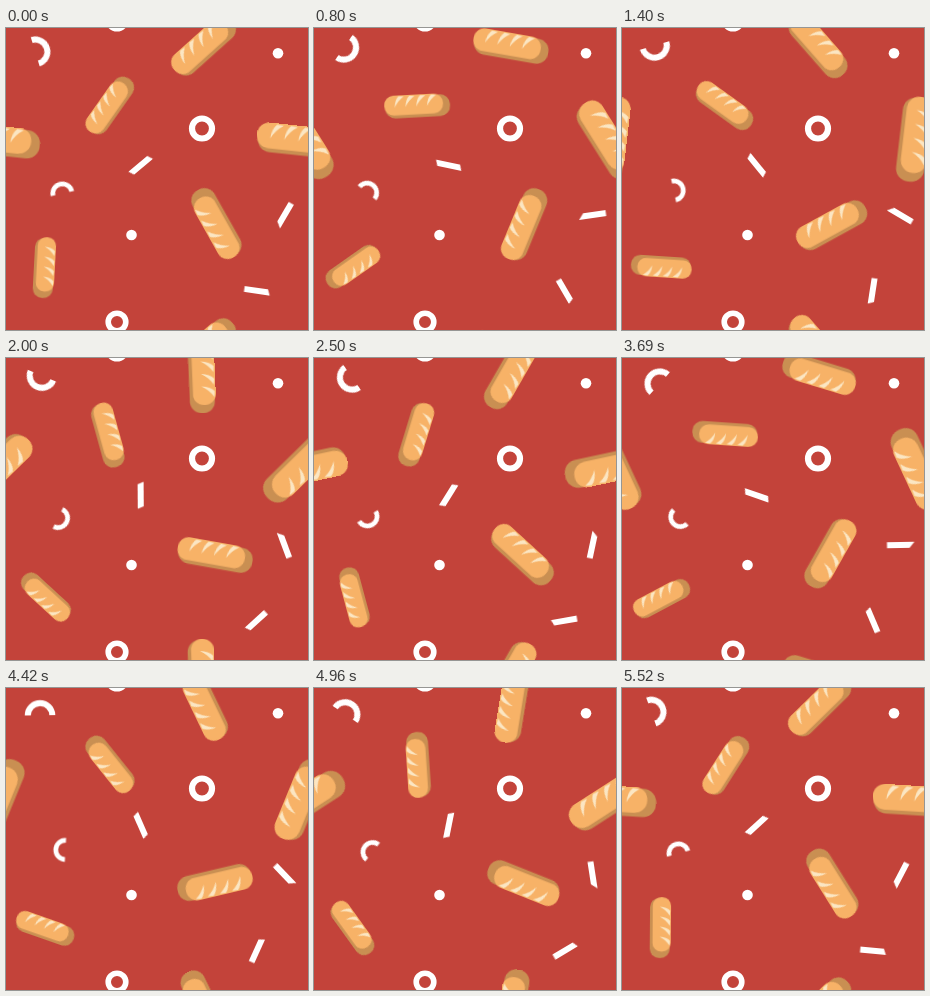
These frames come from a looping animation (302x302 px, 5560 ms). An HTML page:

```html
<!DOCTYPE html>
<html lang="en">
<head>
<meta charset="utf-8">
<title>Bread pattern</title>
<style>
  html, body { margin: 0; width: 100%; height: 100%; overflow: hidden; background: #c3433a; }
  svg { display: block; width: 100vw; height: 100vh; }
  .spin { animation: spin 5560ms linear infinite; transform-origin: 0 0; }
  @keyframes spin { from { transform: rotate(0deg); } to { transform: rotate(360deg); } }
</style>
</head>
<body>
<svg viewBox="0 0 302 302">
  <defs>
    <path id="cut" d="M-4 2Q-3.5-7 1-11L7-10.5Q0-6-4 2Z"/>
    <g id="bread">
      <rect x="-37" y="-10.8" width="75" height="25" rx="11.5" fill="#c98f52"/>
      <rect x="-38" y="-12" width="68" height="22.8" rx="10.8" fill="#f7b267"/>
      <g fill="#fbe6c3">
        <use href="#cut" x="-22"/>
        <use href="#cut" x="-9.5"/>
        <use href="#cut" x="3"/>
        <use href="#cut" x="15.5"/>
      </g>
    </g>
    <!-- half ring, bulging towards +x -->
    <path id="arc" d="M-5-12.2A12.2 12.2 0 0 1-5 12.2" fill="none" stroke="#fff" stroke-width="6"/>
  </defs>

  <rect width="302" height="302" fill="#c3433a"/>

  <g fill="#fff">
    <circle cx="272" cy="25.3" r="5.3"/>
    <circle cx="125.5" cy="207" r="5.3"/>
  </g>
  <g fill="none" stroke="#fff">
    <circle cx="196" cy="100.5" r="10" stroke-width="6.2"/>
    <circle cx="111" cy="294" r="8.8" stroke-width="5.6"/>
    <circle cx="111" cy="-8" r="8.8" stroke-width="5.6"/>
  </g>

  <g transform="translate(34 22.3) rotate(-17)"><use class="spin" href="#arc"/></g>
  <g transform="translate(55.5 161.7) rotate(-103) scale(.79)"><use class="spin" href="#arc"/></g>

  <g fill="#fff">
    <g transform="translate(134.7 137.3) rotate(-40)"><path class="spin" d="M-13.5-3H11L13.5 3H-11Z"/></g>
    <g transform="translate(278.5 187) rotate(-60)"><path class="spin" d="M-9-3H13.5V3H-14Z"/></g>
    <g transform="translate(250.7 262.7) rotate(8)"><path class="spin" d="M-12.5-3H11L13.5 3H-12.5Z"/></g>
  </g>

  <g transform="translate(103.1 76.9) rotate(-55) scale(.865)"><use class="spin" href="#bread"/></g>
  <g transform="translate(209.2 196) rotate(240.5)"><use class="spin" href="#bread"/></g>
  <g transform="translate(39.3 239.6) rotate(93) scale(.8)"><use class="spin" href="#bread"/></g>

  <!-- pieces that wrap around the tile edges -->
  <g transform="translate(197 17) rotate(-42)"><use class="spin" href="#bread"/></g>
  <g transform="translate(197 319) rotate(-42)"><use class="spin" href="#bread"/></g>
  <g transform="translate(293.5 111.3) rotate(6) scale(1.125)"><use class="spin" href="#bread"/></g>
  <g transform="translate(-8.5 111.3) rotate(6) scale(1.125)"><use class="spin" href="#bread"/></g>
</svg>
</body>
</html>
```
